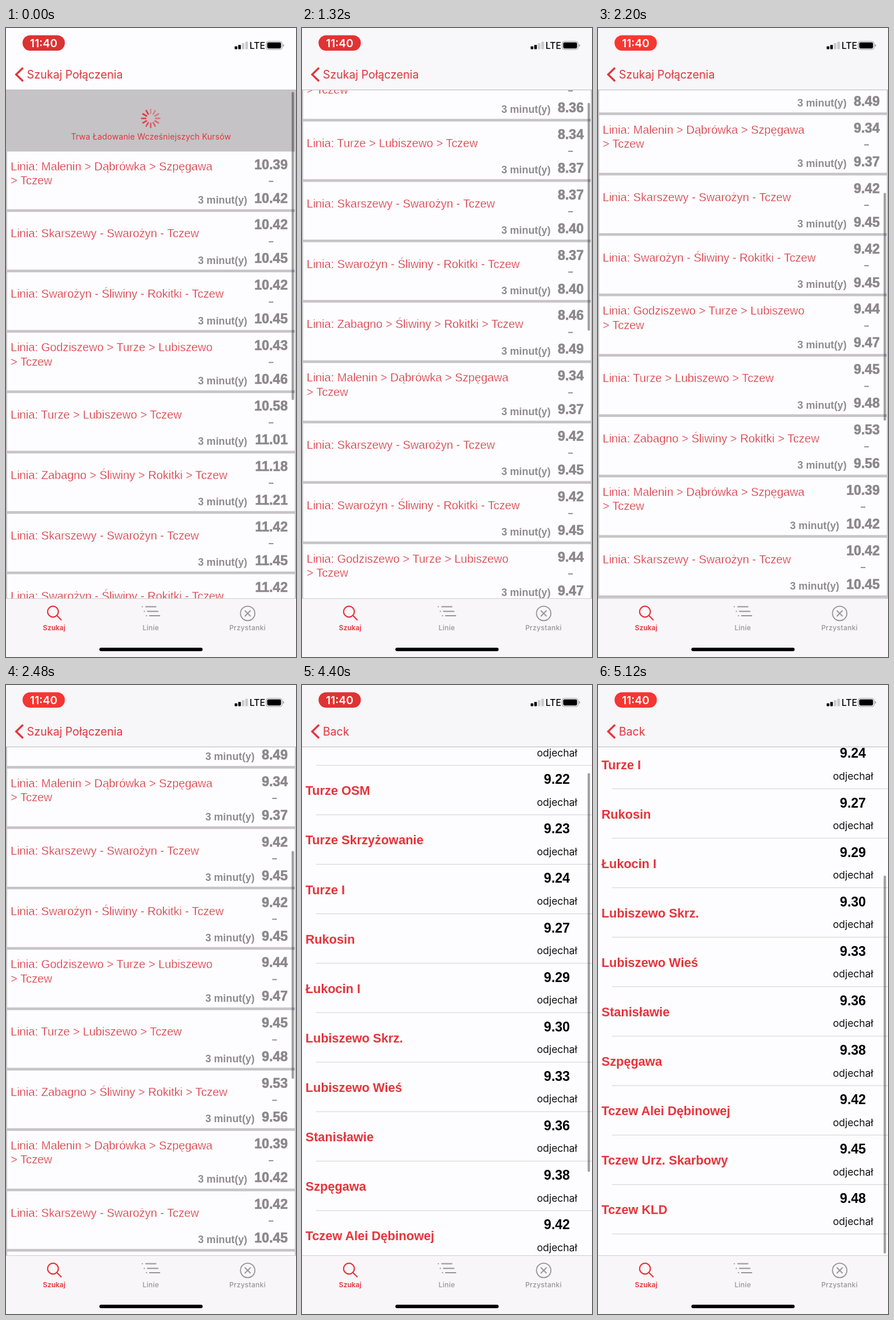
Recreate the animation shown at these times as an HTML page. Size 500 by 1082 pixels, loop 5160 ms.

```html
<!DOCTYPE html>
<html lang="pl">
<head>
<meta charset="utf-8">
<title>Rozkład jazdy</title>
<style>
  html, body { margin: 0; width: 100%; height: 100%; overflow: hidden; background: #fdfcfe; }
  svg { display: block; width: 500px; height: 1082px; }
  text { font-family: Inter, "Liberation Sans", sans-serif; white-space: pre; }
  .line, .min, .time, .stop, .dep { font-family: "Liberation Sans", Arial, sans-serif; }
  .line { font-size: 19.75px; fill: #d3252e; stroke: #fdfcfe; stroke-width: .45px; }
  .min { font-size: 17.8px; font-weight: 700; fill: #8e8c90; text-anchor: end; }
  .time { font-size: 23px; font-weight: 700; fill: #8a888c; stroke: #8a888c; stroke-width: .7px; text-anchor: end; }
  .stop { font-size: 21.6px; font-weight: 700; fill: #e6343b; }
  .dep { font-size: 23px; font-weight: 700; text-anchor: middle; }
  .gone { font-size: 17.4px; text-anchor: middle; fill: #111; }
  .title { font-size: 19.4px; fill: #e2353b; }
  .tab { font-size: 12px; font-weight: 500; letter-spacing: .25px; text-anchor: middle; fill: #97959a; }
  .tab.on { font-weight: 600; letter-spacing: 0; fill: #e5353b; }
  .wait { font-size: 14px; letter-spacing: .1px; text-anchor: middle; fill: #e2353b; }
</style>
</head>
<body>
<svg viewBox="0 0 500 1082">
  <g id="back">
    <rect width="500" height="1082" fill="#c6c4c7"/>
    <g id="list"></g>
    <g id="head">
      <rect y="107" width="500" height="105" fill="#c5c3c6"/>
      <g id="spin" transform="translate(249.5 155.5)" stroke="#e8333a" stroke-width="2.6" stroke-linecap="round"></g>
      <text class="wait" x="250" y="191.5">Trwa Ładowanie Wcześniejszych Kursów</text>
    </g>
  </g>
  <rect id="dim" width="500" height="1082"/>
  <g id="page">
    <rect width="500" height="1082" fill="#fdfcfe"/>
    <g id="stops"></g>
  </g>
  <rect id="thumb" x="492.5" width="4" rx="2" fill="#000" fill-opacity=".38"/>

  <rect id="nav" width="500" height="107"/>
  <path d="M0 106.5H500" stroke="#b9b7ba"/>
  <path id="arrow" d="M29.3 68.5L17.5 80L29.3 91.5" fill="none" stroke="#e2353b" stroke-width="3.3"/>
  <text id="from" class="title" y="87">Szukaj Połączenia</text>
  <text id="to" class="title" y="87">Back</text>
  <rect id="pill" x="28.5" y="12.5" width="73" height="26.5" rx="13.2"/>
  <text x="64.8" y="32.7" font-size="19" font-weight="600" fill="#fff" text-anchor="middle">11:40</text>
  <g id="bars"></g>
  <text x="420" y="35.6" font-size="15.6" font-weight="500">LTE</text>
  <rect x="448.5" y="23" width="27.5" height="14" rx="4" fill="none" stroke="#999"/>
  <rect x="450.3" y="24.8" width="23.9" height="10.4" rx="2.4"/>
  <path d="M477.5 27.5q2 .8 2 2.5t-2 2.5z" fill="#999"/>

  <rect y="981" width="500" height="101" fill="#f8f6f9"/>
  <path d="M0 981.5H500" stroke="#cfcdd0"/>
  <g fill="none" stroke="#e5353b" stroke-width="2.2" stroke-linecap="round">
    <circle cx="81" cy="1004" r="9.3"/>
    <path d="M88 1011L95 1018"/>
  </g>
  <g fill="none" stroke="#97959a" stroke-width="1.8" stroke-linecap="round">
    <path d="M234.8 995.5h.4M241 995.5h17.5M238.3 1003.5h.4M244 1003.5h18M242 1011h.4M247.5 1011h17.5"/>
    <circle cx="416.7" cy="1007" r="12.4"/>
    <path d="M412.2 1002.5l9 9M421.2 1002.5l-9 9"/>
  </g>
  <text class="tab on" x="83" y="1036">Szukaj</text>
  <text class="tab" x="249.7" y="1036">Linie</text>
  <text class="tab" x="416.3" y="1036">Przystanki</text>
  <rect x="161" y="1066" width="178" height="6" rx="3"/>
</svg>
<script>
const $ = id => document.getElementById(id);
const clamp = v => Math.max(0, Math.min(1, v));
const text = (cls, x, y, s) => `<text class="${cls}" x="${x}" y="${y}">${s}</text>`;

const LOOP = 5160, STEP = 40, LOADED = 400, PUSH = 3250;
const ROW = 103.86, STOP = 85.1, EARLIER = 11;

const routes = {
  G: ['Godziszewo > Turze > Lubiszewo', '> Tczew'],
  T: ['Turze > Lubiszewo > Tczew'],
  K: ['Skarszewy - Swarożyn - Tczew'],
  W: ['Swarożyn - Śliwiny - Rokitki - Tczew'],
  Z: ['Zabagno > Śliwiny > Rokitki > Tczew'],
  M: ['Malenin > Dąbrówka > Szpęgawa', '> Tczew']
};
const trips = ('G8.33 T8.34 K8.37 W8.37 Z8.46 M9.34 K9.42 W9.42 G9.44 T9.45 Z9.53 ' +
  'M10.39 K10.42 W10.42 G10.43 T10.58 Z11.18 K11.42 W11.42').split(' ');

function arrival(time) {
  const [h, m] = time.split('.').map(Number), end = h * 60 + m + 3;
  return Math.floor(end / 60) + '.' + String(end % 60).padStart(2, '0');
}

$('list').innerHTML = trips.map((trip, i) => {
  const [first, second] = routes[trip[0]], time = trip.slice(1);
  const wide = time.length > 4, mid = wide ? 457 : 463;
  return `<g transform="translate(0 ${108.5 + i * ROW})">
    <rect x="2" width="496" height="99.3" fill="#fdfcfe"/>
    ${text('line', 8, second ? 32 : 44, 'Linia: ' + first.replace(/>/g, '&gt;'))}
    ${second ? text('line', 8, 56.5, second.replace('>', '&gt;')) : ''}
    ${text('min', wide ? 416 : 428.7, 89.3, '3 minut(y)')}
    ${text('time', 485.7, 30, time)}
    <path d="M${mid - 4} 51.3h8" stroke="#8a888c" stroke-width="1.8"/>
    ${text('time', 485.7, 88, arrival(time))}</g>`;
}).join('');

const stops = [
  ['Turze', 21], ['Turze OSM', 22], ['Turze Skrzyżowanie', 23], ['Turze I', 24],
  ['Rukosin', 27], ['Łukocin I', 29], ['Lubiszewo Skrz.', 30], ['Lubiszewo Wieś', 33],
  ['Stanisławie', 36], ['Szpęgawa', 38], ['Tczew Alei Dębinowej', 42],
  ['Tczew Urz. Skarbowy', 45], ['Tczew KLD', 48]
];
$('stops').innerHTML = stops.map(([name, min], i) =>
  `<g transform="translate(0 ${106.6 + i * STOP})">
    ${text('stop', 6, 50.7, name)}
    ${text('dep', 439.5, 31.5, '9.' + min)}
    ${text('gone', 439.7, 69, 'odjechał')}
    <path d="M24 84.6H500" stroke="#d2d0d3"/></g>`).join('');

$('spin').innerHTML = Array.from({ length: 12 }, (_, i) =>
  `<path d="M0 -8.5V-15.5" transform="rotate(${i * 30})"/>`).join('');
const spokes = [...$('spin').children];

$('bars').innerHTML = [5, 7.5, 10.5, 13].map((h, i) =>
  `<rect x="${394.3 + i * 6.1}" y="${36.5 - h}" width="4.5" height="${h}" rx="1" fill="${i < 2 ? '#000' : '#c9c8ca'}"/>`).join('');

// Smooth curve through [time, value] points, at rest at both ends
function curve(pts, t) {
  const last = pts.length - 1;
  if (t <= pts[0][0]) return pts[0][1];
  if (t >= pts[last][0]) return pts[last][1];
  const i = pts.findIndex(p => p[0] > t) - 1;
  const slope = k => k <= 0 || k >= last ? 0 :
    (pts[k + 1][1] - pts[k - 1][1]) / (pts[k + 1][0] - pts[k - 1][0]);
  const [t0, a] = pts[i], [t1, b] = pts[i + 1], d = t1 - t0, u = (t - t0) / d;
  return a + (b - a) * u * u * (3 - 2 * u) +
    d * u * (1 - u) * (slope(i) * (1 - u) - slope(i + 1) * u);
}
const listScroll = [[1200, 0], [1400, 110], [1680, 329], [1960, 436], [2320, 484]];
const stopScroll = [[4160, 0], [4400, 53], [4640, 165], [4880, 238], [5120, 268]];

function push(t) {
  if (t <= PUSH) return 0;
  const w = 0.01826 * (t - PUSH), p = 1 - (1 + w) * Math.exp(-w);
  return p > 0.998 ? 1 : p;
}

const mix = (a, b, k) => `rgb(${a.map((v, i) => Math.round(v + (b[i] - v) * k))})`;
const move = (id, x, y) => $(id).setAttribute('transform', `translate(${x} ${y})`);
const set = (id, name, v) => $(id).setAttribute(name, v);

function setThumb(y, h, alpha) {
  set('thumb', 'y', y);
  set('thumb', 'height', h);
  set('thumb', 'opacity', alpha);
}

function draw(t) {
  const loading = t < LOADED, p = push(t);
  const y = curve(listScroll, t), sy = curve(stopScroll, t);

  move('list', 0, loading ? 104 - EARLIER * ROW : -y);
  set('head', 'visibility', loading ? 'visible' : 'hidden');
  const lead = 10 + Math.floor(t / 83.3);
  spokes.forEach((s, i) => s.setAttribute('opacity', 1 - ((lead - i) % 12) / 12 * 0.75));

  move('back', -150 * p, 0);
  set('dim', 'opacity', 0.1 * p);
  move('page', 500 * (1 - p), 0);
  move('stops', 0, -sy);

  if (p) {
    const max = stops.length * STOP - 874, over = Math.max(0, sy - max);
    setThumb(110 + Math.min(1, sy / max) * 182 + over, 686 - over, clamp((t - 4170) / 120));
  } else {
    setThumb(110 + y * 0.3627, loading ? 530 : 392, clamp((2900 - t) / 250));
  }

  set('nav', 'fill', mix([253, 252, 254], [247, 246, 249], clamp(y / 60)));
  set('arrow', 'opacity', 1 - 1.2 * p * (1 - p));
  set('from', 'x', 36 - 60 * p);
  set('from', 'opacity', clamp(1 - 2 * p));
  set('to', 'x', 36 + 65 * (1 - p));
  set('to', 'opacity', p);
  set('pill', 'fill', mix([220, 50, 51], [250, 55, 50], 0.5 - 0.5 * Math.cos(2 * Math.PI * t / 1520)));
}

const start = performance.now();
function tick() {
  const t = (performance.now() - start) % LOOP;
  draw(Math.floor(t / STEP) * STEP);
  requestAnimationFrame(tick);
}
draw(0);
requestAnimationFrame(tick);
</script>
</body>
</html>
```
